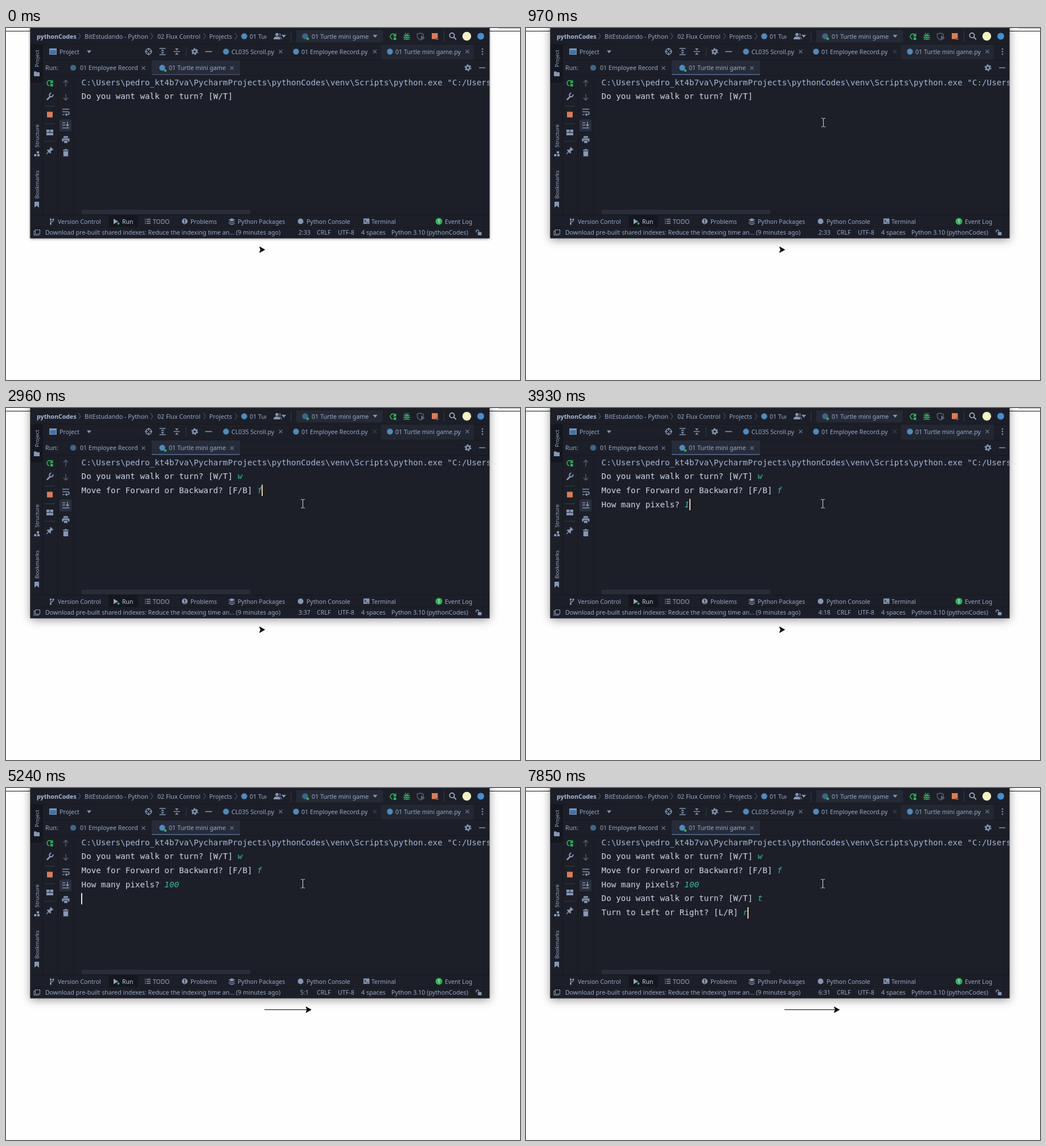
An HTML page that plays this animation: 903 by 620 pixels, repeating every 8 s.

```html
<!DOCTYPE html>
<html lang="en">
<head>
<meta charset="utf-8">
<title>Turtle mini game</title>
<style>
html, body { margin: 0; width: 100%; height: 100%; overflow: hidden; background: #fefefe; }
svg { position: absolute; left: 0; top: 0; display: block; }
#shade { position: absolute; left: 43px; top: -40px; width: 806px; height: 410px; }
text { font-family: "Noto Sans", "Open Sans", sans-serif; font-size: 10.7px; fill: #98a9c8; white-space: pre; }
.mono { font-family: "DejaVu Sans Mono", "Noto Sans Mono", monospace; font-size: 14.24px; fill: #ced7ea; }
.typed { font-style: italic; fill: #35b89c; }
</style>
</head>
<body>
<svg width="903" height="620" viewBox="0 0 903 620">
  <rect y="5" width="903" height="1" fill="#111"/>
  <rect id="edge" x="865" width="38" height="1" fill="#a5aca0"/>
</svg>
<div id="shade"></div>
<svg id="stage" width="903" height="620" viewBox="0 0 903 620">
  <clipPath id="win"><rect x="42.4" y="-2" width="807.2" height="372.4"/></clipPath>
  <clipPath id="crumb"><rect x="426" width="31" height="28"/></clipPath>
  <g id="ui" clip-path="url(#win)"></g>
  <g id="turtle"></g>
  <g id="mouse"></g>
</svg>
<script>
const $ = id => document.getElementById(id);
const NS = 'http://www.w3.org/2000/svg';
const ICON = '#8497b5', DIM = '#566174', GREEN = '#2fb457', RED = '#e07b53', BLUE = '#4a8bc0', BG = '#1c1f27';

function add(tag, attrs, parent = $('ui')) {
  const el = document.createElementNS(NS, tag);
  for (const k in attrs) el.setAttribute(k, attrs[k]);
  return parent.appendChild(el);
}
function label(x, y, str, attrs) {
  const el = add('text', { x, y, ...attrs });
  el.textContent = str;
  return el;
}
const box = (x, y, width, height, fill, more) => add('rect', { x, y, width, height, fill, ...more });
const dot = (cx, cy, r, fill) => add('circle', { cx, cy, r, fill });
const fillPath = (d, fill = ICON) => add('path', { d, fill });
const line = (d, stroke = ICON, w = 1.4) => add('path', { d, stroke, 'stroke-width': w, fill: 'none' });

const cross = (x, y, c = '#6b7890') => line(`M${x - 3} ${y - 3}l6 6m0 -6l-6 6`, c, 1.1);
const chevron = x => line(`M${x - 2} 9l4 5.5l-4 5.5`, '#59647a', 1);
const arrowDown = (x, y) => fillPath(`M${x - 4} ${y - 2}h8l-4 5z`);
const rerun = (x, y) => {
  line(`M${x + 3.5} ${y - 2.5}A4.6 4.6 0 1 0 ${x - 1} ${y + 4.6}`, GREEN, 1.7);
  fillPath(`M${x + 5.5} ${y - 6}v6h-6z`, GREEN);
  box(x + 1, y + 1.5, 4.5, 4.5, GREEN);
};
const gear = (x, y) => {
  add('circle', { cx: x, cy: y, r: 3.2, fill: 'none', stroke: ICON, 'stroke-width': 2.4 });
  add('circle', { cx: x, cy: y, r: 5, fill: 'none', stroke: ICON, 'stroke-width': 2, 'stroke-dasharray': '2.6 2.636' });
};

function drawFrame() {
  box(42, -2, 808, 373, BG);
  box(43, 28, 21, 68, '#14171d');
  box(659, 29, 163, 27, '#222732');
  box(256, 57, 155, 26, '#262c39');
  box(180, 330, 52, 21, '#14171d');
  box(510, 4, 152, 21, '#252a35', { rx: 2 });
  box(94, 161, 21, 21, '#2a303d', { rx: 3 });
  box(133, 320, 296, 8, '#292d38');
  line('M43 28.5H849M64 56.5H849M64 83.5H849M43 329.5H849M43 350.5H849M64.5 29V329M91.5 84V329M118.5 84V329', '#15181e', 1);
  line('M500.5 5v19M769.5 5v19M316.5 33v18M68 137.5h18M68 168.5h18M68 199.5h18', '#333a47', 1);
}

function drawTop() {
  label(54, 19, 'pythonCodes', { 'font-weight': 700, style: 'fill:#a9bbd9' });
  label(138, 19, 'BitEstudando - Python');
  label(266, 19, '02 Flux Control');
  label(357, 19, 'Projects');
  [129, 256, 349, 404].forEach(chevron);
  dot(418.5, 14.5, 5.2, BLUE);
  label(428, 19, '01 Turtle', { 'clip-path': 'url(#crumb)' });
  dot(476, 11.5, 2.8, ICON);
  fillPath('M470 20q0 -5 6 -5t6 5z');
  line('M480 9.5a2.6 2.6 0 0 1 0 5M481 16q3 .5 3 4', ICON, 1.2);
  arrowDown(488, 14);
  dot(525.5, 14.5, 5.2, '#3b668b');
  dot(530, 19, 2.2, GREEN);
  label(537, 19, '01 Turtle mini game');
  arrowDown(648.5, 14);
  rerun(680, 15);
  add('ellipse', { cx: 704, cy: 16, rx: 3.9, ry: 4.8, fill: GREEN });
  line('M698.5 12l3 2m5 0l3 -2M698 16.5h12M698.5 21l3 -2m5 0l3 2M701 9l2 2m2 0l2 -2', GREEN, 1.3);
  line('M700.5 15h7M700.5 18h7', BG, 1);
  line('M722.5 10.5l5.5 -1.5l5 1.5v4q0 4 -5 6.5q-5.5 -2.5 -5.5 -6.5z', DIM, 1.4);
  fillPath('M729 13l7 4.5l-7 4.5z', DIM);
  box(748, 9, 10.5, 10.5, RED);
  box(755.5, 17, 4, 4, '#8a5547');
  add('circle', { cx: 783.5, cy: 13, r: 4.2, fill: 'none', stroke: '#a4b2c9', 'stroke-width': 1.7 });
  line('M786.7 16.2l4 4', '#a4b2c9', 1.9);
  dot(809.5, 14.5, 7.7, '#f4f3c0');
  dot(834, 14.5, 6, '#438fd4');
}

function drawTabs() {
  box(76.5, 36.5, 12, 10, '#3776b5', { stroke: ICON });
  box(76, 36, 13, 3, ICON);
  label(94, 46, 'Project');
  arrowDown(146, 41.5);
  add('circle', { cx: 250.5, cy: 41.5, r: 5, fill: 'none', stroke: ICON, 'stroke-width': 1.4 });
  line('M250.5 35v5m0 3v5M244 41.5h5m3 0h5');
  line('M269.5 36h11M269.5 47h11', ICON, 1.4);
  fillPath('M272 40.5l3 -3l3 3zM272 42.5h6l-3 3z');
  line('M294.5 41.5h11', ICON, 1.4);
  fillPath('M297 36h6l-3 3.5zM297 47h6l-3 -3.5z');
  gear(331.5, 41.5);
  line('M350 41.5h12', ICON, 1.6);
  dot(386.5, 41.5, 5.2, BLUE);
  label(396, 46, 'CL035 Scroll.py');
  cross(482.5, 41.5);
  dot(509.5, 41.5, 5.2, BLUE);
  label(519, 46, '01 Employee Record.py');
  cross(648, 41.5).id = 'close';
  dot(674.5, 41.5, 5.2, BLUE);
  label(684, 46, '01 Turtle mini game.py');
  cross(810.5, 41.5);
  [37, 41.5, 46].forEach(y => dot(837, y, 1.3, ICON));

  label(69, 74, 'Run:');
  dot(118, 70, 5.2, '#3b668b');
  label(130, 74, '01 Employee Record');
  cross(241.5, 70.5);
  dot(274.5, 70, 5.2, BLUE);
  dot(280, 75, 2.2, GREEN);
  label(286, 74, '01 Turtle mini game');
  cross(397, 70.5);
  box(256, 81, 155, 2, '#3e4658').id = 'focus';
  gear(811.5, 70);
  line('M831 70h11', ICON, 1.6);
}

function drawSide() {
  const side = (y, str) => label(0, 0, str, { transform: `translate(58 ${y}) rotate(-90)`, style: 'font-size:9.4px' });
  side(69, 'Project');
  side(210.5, 'Structure');
  side(300.5, 'Bookmarks');
  fillPath('M49 76.5h4l1.5 1.5h4.5v7h-10z');
  box(54, 217, 4, 4, ICON);
  box(49.5, 222, 4, 4, ICON);
  box(55, 222, 4, 4, ICON);
  fillPath('M50 306h8v10.5l-4 -3.5l-4 3.5z');

  rerun(77, 97);
  line('M71.8 126.5l6 -6', ICON, 2.6);
  line('M82.5 117a3.2 3.2 0 1 1 -3 -2.2', ICON, 2);
  box(72, 147.5, 10, 10, RED);
  box(71, 179, 5.5, 4.5, ICON);
  box(77.5, 179, 5.5, 4.5, ICON);
  box(71, 184.5, 12, 4.5, ICON);
  fillPath('M78.5 209.5l5 5l-1.5 1l-1 -.4l-2.4 2.4l.4 2.8l-1.3 1l-6 -6l1.2 -1.2l2.6 .3l2.4 -2.4l-.6 -1.2z');
  line('M75 218l-4 4', ICON, 1.3);

  line('M105 103v-11m-4 4l4 -4.3l4 4.3', DIM, 1.4);
  line('M105 116v11m-4 -4l4 4.3l4 -4.3', DIM, 1.4);
  line('M99 143h12M99 147.5h9.5a2.4 2.4 0 0 1 0 5h-3M99 152.5h3.5', ICON, 1.5);
  fillPath('M107 149.5v6l-3.5 -3z');
  line('M99 167h5M99 171h5M99 176h12', ICON, 1.5);
  line('M108 165v6', ICON, 1.5);
  fillPath('M104.8 170h6.4l-3.2 4z');
  fillPath('M101 190.5h8v3h-8zM98.5 194.5h13v5.5h-2.5v-2.5h-8v2.5h-2.5zM102 198.5h6v4h-6z');
  fillPath('M100 216h10v-1.6h-3v-1.2h-4v1.2h-3zM100.8 217h8.4v9h-8.4z');
}

function drawBottom() {
  const tool = (x, str, style = '') => label(x, 345, str, { style: 'font-size:10.45px;' + style });
  line('M78.5 338v7M83 338q0 3.5 -4 4', ICON, 1.3);
  [[78.5, 337], [83, 337.5], [78.5, 345]].forEach(([x, y]) => dot(x, y, 1.7, ICON));
  tool(91, 'Version Control');
  fillPath('M189 336l8 4.7l-8 4.7z', '#94a4bd');
  dot(197.5, 344.5, 2, GREEN);
  tool(204, 'Run', 'fill:#c0cce0');
  line('M247 337h7M247 340.5h7M247 344h7M244 337h1.6M244 340.5h1.6M244 344h1.6', ICON, 1.6);
  tool(258, 'TODO');
  dot(314, 340.5, 5, ICON);
  line('M314 337.3v4M314 342.3v1.6', BG, 1.6);
  tool(324, 'Problems');
  fillPath('M391 338l5.7 -3l5.7 3l-5.7 3z');
  line('M391.5 341l5.2 2.6l5.2 -2.6M391.5 344l5.2 2.6l5.2 -2.6', ICON, 1.2);
  tool(407, 'Python Packages');
  dot(517.5, 340.5, 5, ICON);
  tool(528, 'Python Console');
  box(628, 335.5, 10.5, 9.5, ICON);
  line('M630 338l2.4 2.2l-2.4 2.2M633.5 343h3.5', BG, 1.2);
  tool(642, 'Terminal');
  dot(760.5, 340.5, 6, GREEN);
  label(760.5, 344, '1', { 'text-anchor': 'middle', style: 'font-size:9px;fill:#fff' });
  tool(771, 'Event Log');

  line('M51.5 355.5h8v7.5h-8zM51 357.5h-1.8v7.5h8v-1.6', ICON, 1.1);
  label(69, 364, 'Download pre-built shared indexes: Reduce the indexing time an... (9 minutes ago)');
  label(524.3, 364, '', { 'text-anchor': 'middle' }).id = 'pos';
  label(546, 364, 'CRLF');
  label(583, 364, 'UTF-8');
  label(624, 364, '4 spaces');
  label(677, 364, 'Python 3.10 (pythonCodes)');
  box(829, 359.5, 6.5, 5.5, ICON);
  line('M826 360v-2.2a2.2 2.2 0 0 1 4.4 0v2', ICON, 1.3);
}

// Console: one entry per input line; keys are [time, character]
const PITCH = 8.572, LEFT = 132.6, TOP = 125.2, ROW = 24.7;
const rows = [
  { ask: 'Do you want walk or turn? [W/T] ', at: 0, keys: [[1660, 'w']], enter: 1860 },
  { ask: 'Move for Forward or Backward? [F/B] ', at: 2060, keys: [[2960, 'f']], enter: 3060 },
  { ask: 'How many pixels? ', at: 3280, keys: [[3930, '1'], [4100, '0'], [4270, '0']], enter: 4480 },
  { ask: 'Do you want walk or turn? [W/T] ', at: 5570, keys: [[6600, 't']], enter: 6770 },
  { ask: 'Turn to Left or Right? [L/R] ', at: 6960, keys: [[7670, 'r']], enter: Infinity }
];
const places = [[0, '2:33'], [1750, '2:34'], [1950, '3:1'], [2160, '3:37'], [3060, '4:1'], [3400, '4:18'],
  [4020, '4:19'], [4190, '4:20'], [4360, '4:21'], [4730, '5:1'], [5680, '5:33'], [6690, '5:34'],
  [6860, '6:1'], [7050, '6:30'], [7760, '6:31']];

drawFrame();
drawTop();
drawTabs();
drawSide();
drawBottom();
label(LEFT, TOP - ROW, 'C:\\Users\\pedro_kt4b7va\\PycharmProjects\\pythonCodes\\venv\\Scripts\\python.exe "C:/Users/pedro_kt4b7va',
  { class: 'mono', style: 'fill:#a5b8dc' });
rows.forEach((r, i) => {
  const y = TOP + i * ROW;
  r.askEl = label(LEFT, y, r.ask, { class: 'mono' });
  r.keyEl = label(LEFT + r.ask.length * PITCH, y, '', { class: 'mono typed' });
});
const caret = box(0, 0, 2, 20, '#fff');

const trail = add('path', { stroke: '#000' }, $('turtle'));
const head = add('path', { d: 'M0 0l-9 -5l2 5l-2 5z', stroke: '#000', 'stroke-width': 1 }, $('turtle'));
const arrow = add('path', { d: 'M0 0v15.5l3.6 -3.4l2.6 6l2.4 -1l-2.6 -5.9h5z', fill: '#fff', stroke: '#000' }, $('mouse'));
const beam = add('path', { d: 'M-3.5 -7.5h2.5l1 1l1 -1h2.5M0 -6.5v13M-3.5 7.5h2.5l1 -1l1 1h2.5', fill: 'none', stroke: '#d8dbe0' }, $('mouse'));

const clamp = (v, a, b) => Math.min(b, Math.max(a, v));
const show = (el, on) => el.setAttribute('visibility', on ? 'visible' : 'hidden');

function drawConsole(t) {
  let row = 0;
  rows.forEach((r, i) => {
    r.text = r.keys.filter(k => t >= k[0]).map(k => k[1]).join('');
    r.keyEl.textContent = r.text;
    show(r.askEl, t >= r.at);
    if (t >= r.enter) row = i + 1;
  });
  const r = rows[row];
  const col = t >= r.at ? r.ask.length + r.text.length : 0;
  caret.setAttribute('x', Math.round(LEFT - .3 + col * PITCH));
  caret.setAttribute('y', Math.round(TOP - 14.5 + row * ROW));
  caret.setAttribute('fill', r.text ? '#f3c6a4' : '#dfe3ea');
  show(caret, t >= 1660 && !(t >= 6190 && t < 6600));
  $('pos').textContent = places.filter(p => t >= p[0]).pop()[1];
}

function drawMouse(t) {
  const u = clamp((t - 160) / 840, 0, 1);
  const x = Math.floor(563 - 42 * u ** 1.25) + .5;
  const y = Math.floor(-18 + 187 * (1 - (1 - u) ** 1.55)) - .5;
  $('mouse').setAttribute('transform', `translate(${x} ${y})`);
  show(arrow, y < 84);
  show(beam, y >= 84);
}

function drawTurtle(t) {
  const x = 454.5 + 4.8 * clamp(Math.floor((t - 4615) / 35.5), 0, 20);
  trail.setAttribute('d', `M454 390.5H${x}`);
  show(trail, x > 455);
  head.setAttribute('transform', `translate(${x} 390.5)`);
}

function render(t) {
  drawConsole(t);
  drawMouse(t);
  drawTurtle(t);
  $('shade').style.boxShadow = t < 910 ? '0 1px 5px rgba(0,0,0,.5)' : '0 3px 15px rgba(0,0,0,.42)';
  $('focus').setAttribute('fill', t < 970 ? '#3e4658' : '#4a5b7c');
  $('close').setAttribute('stroke', t < 330 ? '#6b7890' : '#3c4453');
  show($('edge'), t < 4300);
}

function tick() {
  render(performance.now() % 8000);
  requestAnimationFrame(tick);
}
tick();
</script>
</body>
</html>
```
